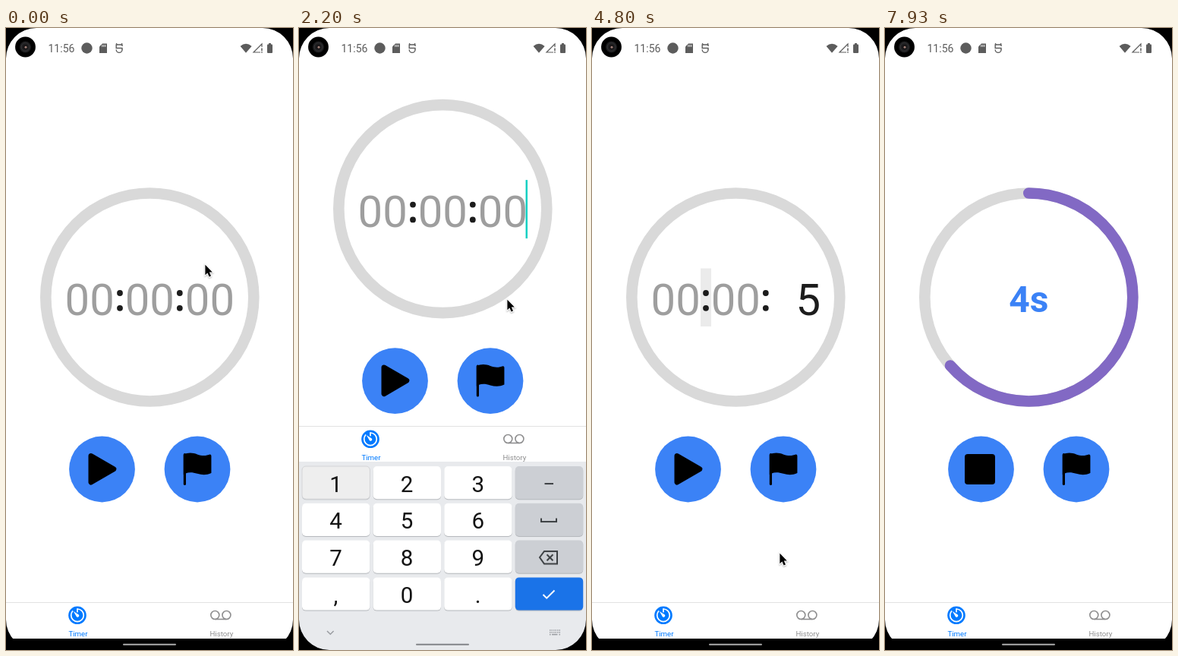
Write an HTML page with a canvas that moves like this. It is 378x819 px and loops after 8 s.

```html
<!DOCTYPE html>
<html lang="en">
<head>
<meta charset="utf-8">
<title>Timer</title>
<style>
html, body { margin: 0; width: 100%; height: 100%; overflow: hidden; background: #000; }
canvas { display: block; width: 378px; height: 819px; }
</style>
</head>
<body>
<canvas id="stage"></canvas>
<script>
const W = 378, H = 819, LOOP = 8000, TAU = Math.PI * 2;
const BLUE = '#3b82f6', INK = '#1c1c1c', GREY = '#9e9e9e', STATUS = '#5c5c5c';
const CX = 189.3, RING_Y = 354.5, RING_R = 137;
const KB_TOP = 571, KB_H = H - KB_TOP;

const dpr = window.devicePixelRatio || 1;

function sized(canvas, h) {
  canvas.width = W * dpr;
  canvas.height = h * dpr;
  const c = canvas.getContext('2d');
  c.scale(dpr, dpr);
  return c;
}

const g = sized(document.getElementById('stage'), H);
const kbCanvas = document.createElement('canvas');
const k = sized(kbCanvas, KB_H);

const clamp = v => Math.max(0, Math.min(1, v));
const span = (t, from, ms) => clamp((t - from) / ms);
const within = (t, a, b) => t >= a && t < b;
const easeOut = u => 1 - (1 - u) ** 3;
const smooth = u => u * u * (3 - 2 * u);
const mix = (a, b, u) => `rgb(${a.map((v, i) => Math.round(v + (b[i] - v) * u))})`;

function disc(c, x, y, r, fill) {
  c.beginPath();
  c.arc(x, y, r, 0, TAU);
  c.fillStyle = fill;
  c.fill();
}

function arc(c, x, y, r, width, color, from = 0, to = TAU) {
  c.beginPath();
  c.arc(x, y, r, from, to);
  c.lineWidth = width;
  c.strokeStyle = color;
  c.stroke();
}

function box(c, x, y, w, h, r, fill) {
  c.beginPath();
  c.roundRect(x, y, w, h, r);
  c.fillStyle = fill;
  c.fill();
}

function line(c, pts, width, color, close = false) {
  c.beginPath();
  pts.forEach(([x, y], i) => i ? c.lineTo(x, y) : c.moveTo(x, y));
  if (close) c.closePath();
  c.lineWidth = width;
  c.strokeStyle = color;
  c.stroke();
}

function text(c, s, x, y, size, color, align = 'center', weight = 400) {
  c.font = `${weight} ${size}px Roboto, sans-serif`;
  c.textAlign = align;
  c.fillStyle = color;
  c.fillText(s, x, y);
}

// Pointer stops: time, x, y, eased
const path = [
  [1290, 262, 311], [1600, 274, 357, 1], [2630, 274, 357],
  [3070, 321, 572], [3470, 334, 728], [3730, 330, 757, 1],
  [4300, 330, 757], [4800, 247, 691], [5130, 121, 588, 1],
  [5180, 121, 588], [5400, 130, 622, 1], [5570, 130, 622],
  [5860, 118, 587, 1], [6300, 118, 587], [6870, 125, 604],
  [7130, 130, 607, 1], [7230, 130, 607], [7450, 129, 611, 1]
];

function pointerAt(t) {
  const n = path.findIndex(p => p[0] > t);
  if (n === 0) return path[0].slice(1, 3);
  if (n < 0) return path[path.length - 1].slice(1, 3);
  const a = path[n - 1], b = path[n];
  let u = (t - a[0]) / (b[0] - a[0]);
  if (b[3]) u = smooth(u);
  return [a[1] + (b[1] - a[1]) * u, a[2] + (b[2] - a[2]) * u];
}

function drawPointer(t) {
  if (t >= 7450) return;
  const [x, y] = pointerAt(t);
  g.save();
  g.translate(x, y);
  g.shadowColor = 'rgba(0,0,0,.3)';
  g.shadowBlur = 2;
  g.shadowOffsetY = 1;
  const pts = [[0.4, 0.8], [0.4, 14.2], [3.4, 11.4], [5.6, 16.6], [8, 15.6], [5.8, 10.5], [9.8, 10.5]];
  line(g, pts, 2, '#fff', true);
  g.shadowColor = 'transparent';
  g.fillStyle = '#000';
  g.fill();
  g.restore();
}

function drawStatus() {
  text(g, '11:56', 55.5, 32, 14, STATUS, 'left');
  disc(g, 106.5, 26.5, 7.2, STATUS);

  g.fillStyle = STATUS;
  g.beginPath();
  g.moveTo(127, 20.5);
  g.lineTo(133, 20.5);
  g.lineTo(133, 33);
  g.lineTo(123, 33);
  g.lineTo(123, 24.5);
  g.fill();
  for (let i = 0; i < 3; i++) box(g, 126.3 + i * 2, 22.3, 1, 2.4, 0, '#fff');

  line(g, [[153, 24], [153, 22], [145.2, 22], [145.2, 26.5], [153, 26.5], [153, 29]], 1.4, STATUS);
  arc(g, 149.1, 28.5, 3.9, 1.4, STATUS, 0, Math.PI);
  line(g, [[145.2, 20], [146.5, 22]], 1.2, STATUS);
  line(g, [[153, 20], [151.7, 22]], 1.2, STATUS);

  g.fillStyle = STATUS;
  g.beginPath();
  g.moveTo(316, 32.8);
  g.lineTo(308.6, 24);
  g.quadraticCurveTo(316, 17.6, 323.6, 24);
  g.fill();
  line(g, [[335, 32], [326, 32], [337, 21], [337, 25]], 1.2, STATUS);
  box(g, 336.2, 26.5, 1.5, 3.7, 0, STATUS);
  box(g, 336.2, 31.3, 1.5, 1.5, 0, STATUS);
  box(g, 344, 21.5, 7, 11.5, 1, STATUS);
  box(g, 346, 20, 3, 2, 0, STATUS);
}

function drawRing(t, running) {
  arc(g, CX, RING_Y, RING_R, 14.6, '#d9d9d9');
  if (!running) return;
  const gone = clamp((t - 6110) / 5000);
  g.lineCap = 'round';
  arc(g, CX, RING_Y, RING_R, 14.6, mix([59, 130, 246], [255, 61, 109], gone),
    -TAU / 4, -TAU / 4 + TAU * (1 - gone));
  g.lineCap = 'butt';
  text(g, (t < 7270 ? 5 : 4) + 's', CX, 374, 48, BLUE, 'center', 700);
}

function drawField(t, selected) {
  const base = 378, size = 58;
  if (selected) box(g, 143, 316.5, 14, 76.5, 0, '#ebebeb');
  text(g, '00', 77.6, base, size, GREY, 'left');
  text(g, '00', 156.7, base, size, GREY, 'left');
  for (const x of [150, 228.8]) {
    disc(g, x, 349, 3.9, INK);
    disc(g, x, 368.8, 3.9, INK);
  }
  const typed = t >= 2530;
  text(g, typed ? '5' : '00', 301, base, size, typed ? INK : GREY, 'right');
  const caret = within(t, 1870, 2400) || within(t, 2530, 3035) || within(t, 3530, 4065);
  if (caret) box(g, 298.5, 316.5, 2.5, 77, 0, '#12d0c3');
}

function drawButtons(running, pressed) {
  disc(g, 126.5, 581, 43.4, pressed ? '#cfe8ef' : BLUE);
  disc(g, 252, 581, 43.4, BLUE);
  g.lineJoin = 'round';
  if (running) {
    box(g, 105, 561, 40, 40, 4, '#000');
  } else {
    line(g, [[112, 563.5], [141.8, 580.7], [112, 598]], 7, '#000', true);
    g.fillStyle = '#000';
    g.fill();
  }
  g.lineJoin = 'miter';

  box(g, 233.8, 560, 3.2, 42, 1.5, '#000');
  g.fillStyle = '#000';
  g.beginPath();
  g.moveTo(233.8, 562);
  g.bezierCurveTo(239, 558.6, 246, 559, 252, 561.4);
  g.bezierCurveTo(258, 563.8, 264, 563.4, 268.5, 561.6);
  g.quadraticCurveTo(270.4, 561.4, 270.4, 563.4);
  g.lineTo(270.4, 586);
  g.bezierCurveTo(264, 589, 258, 588.6, 252, 586.8);
  g.bezierCurveTo(246, 584.8, 241, 584.6, 236.5, 586.4);
  g.lineTo(233.8, 588);
  g.fill();
}

function drawTabs() {
  box(g, 0, 756, W, 120, 0, '#fff');
  box(g, 0, 756, W, 1, 0, '#e2e2e2');
  const blue = '#007aff', grey = '#8e8e8f', x = 94, y = 773.3;
  disc(g, x, y, 11.8, blue);
  g.lineCap = 'round';
  arc(g, x, y, 8.3, 1.7, '#fff', -TAU / 4, TAU * 0.61);
  line(g, [[x, y - 8.3], [x, y - 4.6]], 1.7, '#fff');
  g.lineCap = 'butt';
  g.fillStyle = '#fff';
  g.beginPath();
  g.moveTo(x - 5.2, y - 5.2);
  g.lineTo(x + 1.8, y - 0.9);
  g.arc(x + 0.3, y + 0.4, 2, -0.7, 2.3);
  g.fill();
  text(g, 'Timer', 95, 801, 9.7, blue);

  arc(g, 275.3, 773, 5.5, 1.6, grey);
  arc(g, 290.4, 773, 5.5, 1.6, grey);
  line(g, [[275.3, 778.5], [290.4, 778.5]], 1.6, grey);
  text(g, 'History', 283.8, 801, 9.7, grey);
}

function drawKeyboard(enterDown) {
  k.fillStyle = '#e8eaed';
  k.fillRect(0, 0, W, KB_H);
  const labels = ['123', '456', '789', ',0.'];
  for (let row = 0; row < 4; row++) {
    const y = 6 + row * 48.8;
    for (let col = 0; col < 4; col++) {
      const x = 4 + col * 93.6, enter = col === 3 && row === 3, held = !col && !row;
      let fill = col < 3 ? '#fff' : '#cccfd4';
      if (enter) fill = enterDown ? '#185abc' : '#1a73e8';
      if (held) fill = '#eeeeee';
      box(k, x, y + 1, 89.4, 43.2, 5, '#b4b7bb');
      box(k, x, y, 89.4, 43.2, 5, fill);
      if (held) {
        k.strokeStyle = '#d4d5d7';
        k.lineWidth = 1;
        k.stroke();
      }
      if (col < 3) text(k, labels[row][col], x + 44.5, y + 33.6, 29.5, '#111');
    }
  }
  const ink = '#3c4043', x = 329;
  box(k, x - 5.5, 28, 11.5, 2, 0, ink);
  line(k, [[x - 10, 74.5], [x - 10, 79], [x + 10, 79], [x + 10, 74.5]], 2, ink);
  line(k, [[x - 12, 126], [x - 6, 118], [x + 11, 118], [x + 11, 134.5], [x - 6, 134.5]], 2, ink, true);
  line(k, [[x - 2.5, 122.3], [x + 5.5, 130.3]], 2, ink);
  line(k, [[x + 5.5, 122.3], [x - 2.5, 130.3]], 2, ink);
  line(k, [[x - 7.5, 175], [x - 2.8, 179.7], [x + 7.5, 169.5]], 2, '#fff');
}

function drawNav(shown) {
  g.globalAlpha = 1 - shown;
  box(g, 0, 804, W, 15, 0, '#000');
  g.globalAlpha = shown;
  const tint = mix([255, 255, 255], [154, 157, 162], shown);
  line(g, [[37, 794], [41.3, 798.2], [45.6, 794]], 1.5, tint);
  for (let row = 0; row < 2; row++)
    for (let i = 0; i < 6; i++) box(g, 330 + i * 2.5, 792.2 + row * 2.8, 1.5, 1.6, 0, tint);
  box(g, 330, 797.8, 1.5, 1.6, 0, tint);
  box(g, 333, 797.8, 7.5, 1.6, 0, tint);
  box(g, 342.5, 797.8, 1.5, 1.6, 0, tint);
  g.globalAlpha = 1;
  box(g, 154, 810.8, 70, 2, 1, mix([172, 172, 172], [130, 132, 136], shown));
}

function drawBezel() {
  g.fillStyle = '#000';
  g.beginPath();
  g.rect(0, 0, W, H);
  g.roundRect(0, 0, W, H, 40);
  g.fill('evenodd');
  disc(g, 25.5, 25, 13.4, '#000');
  disc(g, 25.5, 25, 7.5, '#1d1d1f');
  arc(g, 25.5, 25, 5.3, 1, '#343436');
  disc(g, 25.5, 25, 3, '#171416');
  disc(g, 26, 25.2, 1.5, '#a08078');
}

function draw(t) {
  const raised = within(t, 1930, 4395);
  const running = t >= 6070;
  const shown = t < 4330 ? easeOut(span(t, 1930, 281)) : 1 - smooth(span(t, 4310, 220));

  g.fillStyle = '#fff';
  g.fillRect(0, 0, W, H);
  drawStatus();

  g.save();
  if (raised) g.translate(0, -116.4);
  drawRing(t, running);
  if (!running) drawField(t, within(t, 4395, 5800));
  drawButtons(running, within(t, 5800, 6070));
  g.restore();

  g.save();
  if (raised) g.translate(0, -232);
  drawTabs();
  g.restore();

  if (shown > 0) {
    drawKeyboard(within(t, 4065, 4330));
    g.globalAlpha = shown;
    g.drawImage(kbCanvas, 0, KB_TOP + KB_H * (1 - shown), W, KB_H);
    g.globalAlpha = 1;
  }
  drawNav(shown);
  drawBezel();
  drawPointer(t);
}

let start = null;
function frame(now) {
  if (start === null) start = now;
  draw(Math.max(0, now - start) % LOOP);
  requestAnimationFrame(frame);
}
draw(0);
requestAnimationFrame(frame);
</script>
</body>
</html>
```
